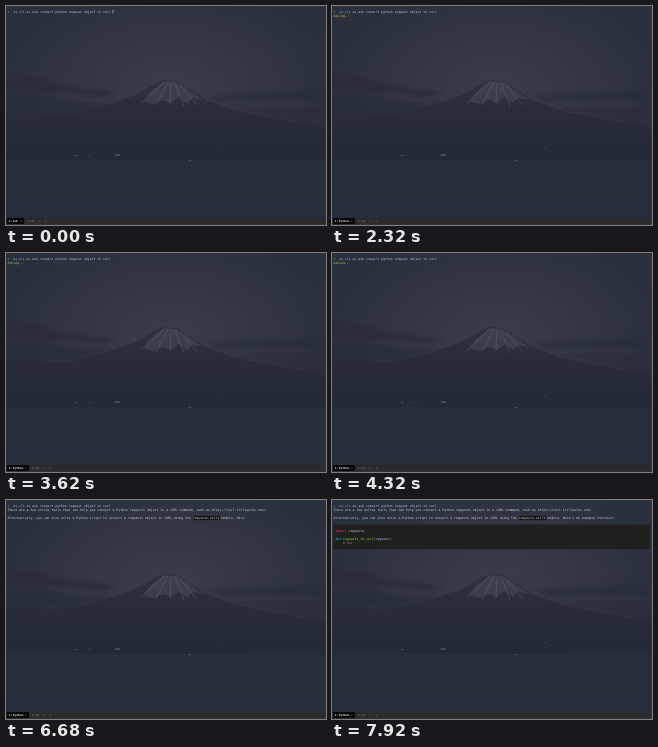
An HTML page for the animation above (8 s loop, 320x219 px).

```html
<!DOCTYPE html>
<html lang="en">
<head>
<meta charset="utf-8">
<title>Terminal</title>
<style>
html, body { margin: 0; width: 100%; height: 100%; overflow: hidden; background: #292f3b; }
svg { display: block; width: 100%; height: 100%; }
text { font: 3.18px "DejaVu Sans Mono", "Liberation Mono", monospace; white-space: pre; text-rendering: geometricPrecision; fill: #ccd2dd; }
.tab { font: 2.7px "DejaVu Sans", "Liberation Sans", sans-serif; fill: #85878c; }
.active { font-weight: bold; fill: #dcdde0; }
.hidden { display: none; }
</style>
</head>
<body>
<svg viewBox="0 0 320 219" preserveAspectRatio="none">
  <defs>
    <radialGradient id="sky" gradientUnits="userSpaceOnUse" cx="165" cy="82" r="180" gradientTransform="translate(0 32.8) scale(1 .6)">
      <stop offset="0" stop-color="#393c49"/>
      <stop offset=".5" stop-color="#323643"/>
      <stop offset="1" stop-color="#2a2f3c"/>
    </radialGradient>
    <linearGradient id="land" gradientUnits="userSpaceOnUse" x1="0" y1="74" x2="0" y2="155">
      <stop offset="0" stop-color="#2e323f"/>
      <stop offset=".45" stop-color="#272c38"/>
      <stop offset="1" stop-color="#242a35"/>
    </linearGradient>
    <linearGradient id="lake" x2="0" y2="1">
      <stop offset="0" stop-color="#282d3a"/>
      <stop offset="1" stop-color="#262c39"/>
    </linearGradient>
    <filter id="soft" x="-20%" y="-50%" width="140%" height="200%"><feGaussianBlur stdDeviation="1.6"/></filter>
    <filter id="haze"><feGaussianBlur stdDeviation=".5"/></filter>
  </defs>

  <rect width="320" height="125" fill="url(#sky)"/>
  <g fill="#2a2e3a" filter="url(#soft)">
    <path d="M-5 71Q20 67 40 74T75 82 112 87L90 91 60 86 30 88-5 82Z" opacity=".8"/>
    <path d="M-5 90Q30 85 55 92T105 95L85 103 60 108-5 106Z" opacity=".75"/>
    <path d="M200 91Q240 85 325 84V97Q270 94 215 97Z" opacity=".6"/>
    <path d="M222 102Q270 97 325 102V120L270 112Z" opacity=".5"/>
  </g>
  <g filter="url(#haze)">
    <path d="M0 156V104L20 103 42 109 65 108 100 99 130 89 150 77 158 74 170 75 180 81 200 94 230 105 270 113 320 122V156Z" fill="url(#land)"/>
    <path d="M158 75L170 76 180 82 197 94 186 92 181 97 173 91 165 97 157 94 147 98 138 96 143 87Z" fill="#4b4f5c" opacity=".5"/>
    <path d="M158 76L135 97M162 76L150 99M165 77L164 98M169 77L178 100M174 79L191 99" fill="none" stroke="#5b606c" stroke-width=".9" opacity=".6"/>
    <rect y="154" width="320" height="60" fill="url(#lake)"/>
    <path d="M75 156H235" stroke="#2e3340" stroke-width=".8"/>
  </g>
  <g fill="#4b505a">
    <rect x="109" y="148.6" width="5" height=".9" fill="#6d6f75"/>
    <rect x="69" y="149" width="3" height=".8"/>
    <rect x="82" y="149" width="3" height=".6" opacity=".6"/>
    <rect x="182" y="154" width="3" height=".8"/>
    <rect x="212" y="142" width="2" height=".8" opacity=".7"/>
  </g>

  <rect y="212" width="320" height="7" fill="#2b2b2e"/>
  <path d="M0 .5H320M319.5 0V219M0 218.5H320" stroke="#343135" fill="none"/>

  <rect id="tabBox" x="1" y="212" height="6" fill="#050506"/>
  <text class="tab active" id="title" x="2.8" y="216.2"></text>
  <g id="otherTabs">
    <text class="tab" x="14" y="216.2" fill="#dcdde0">×</text>
    <text class="tab" x="21" y="216.2">2: zsh</text>
    <text class="tab" x="32" y="216.2">×</text>
    <text class="tab" x="38.5" y="216.2">+</text>
  </g>

  <text x="1.5" y="6.6" fill="#93d0a6"><tspan fill="#93d0a6">➜</tspan></text>
  <text x="7.24" y="6.6"><tspan fill="#8fc0e6">ai_cli</tspan><tspan fill="#c6c8ea"> ai ask convert python request object to curl</tspan></text>
  <rect id="cursor" width=".8" height="3.6" fill="#a9afba"/>
  <text id="asking" x="1.5" y="10.8">Asking...</text>
  <text id="first" x="1.5" y="10.8"></text>
  <rect id="chip" x="187.1" y="15.9" width="26.8" height="4.2" fill="#111416"/>
  <text id="second" x="1.5" y="19.1"></text>

  <g id="code">
    <rect x="1.5" y="24.4" width="316.5" height="24.9" fill="#1e201e"/>
    <text x="3.4" y="31.5"><tspan fill="#f92f66">import</tspan> requests</text>
    <text x="3.4" y="39.8"><tspan fill="#66d0e4">def</tspan> <tspan fill="#a6e22e">requests_to_curl</tspan>(request):</text>
    <text x="11.1" y="43.9"><tspan fill="#959077"># Get</tspan></text>
  </g>
</svg>
<script>
const LOOP = 8000;
const el = id => document.getElementById(id);
const show = (id, on) => el(id).classList.toggle("hidden", !on);

const FIRST = "There are a few online tools that can help you convert a Python requests object to a cURL command, such as https://curl.trillworks.com/.";
const LEAD = "Alternatively, you can also write a Python script to convert a requests object to cURL using the ";
const MODULE = "requests.utils";
const TAIL = " module. Here's an example function:";

// Number of characters streamed so far: [time, count]
const firstSteps = [[0, 0], [4700, 79], [5680, FIRST.length]];
const secondSteps = [[0, 0], [5680, 27], [6680, 124], [7800, 999]];
const stepAt = (steps, t) => steps.filter(s => s[0] <= t).pop()[1];

// Status colour: yellow, drifting to green and back
const YELLOW = [205, 190, 100], GREEN = [145, 205, 115];
const ramp = (t, from) => Math.min(1, Math.max(0, (t - from) / 740));
function statusColour(t) {
  const k = ramp(t, 2320) - ramp(t, 3800);
  return `rgb(${YELLOW.map((y, i) => y + (GREEN[i] - y) * k)})`;
}

const span = (text, fill) => {
  const s = document.createElementNS("http://www.w3.org/2000/svg", "tspan");
  s.textContent = text;
  if (fill) s.setAttribute("fill", fill);
  return s;
};

function drawSecond(count) {
  const mid = LEAD.length, end = mid + MODULE.length;
  const all = LEAD + MODULE + TAIL;
  el("second").replaceChildren(
    span(all.slice(0, Math.min(count, mid))),
    span(all.slice(mid, Math.max(mid, Math.min(count, end))), "#d2dccb"),
    span(all.slice(end, Math.max(end, count))));
  show("chip", count >= end);
}

let shown = -1;
function draw(t) {
  const running = t >= 940;
  el("title").textContent = running ? "1: Python" : "1: zsh";
  el("tabBox").setAttribute("width", running ? 22 : 17);
  el("otherTabs").setAttribute("transform", `translate(${running ? 4.7 : 0})`);

  const entered = t >= 820;
  show("cursor", t < 500 || entered && t < 1800);
  el("cursor").setAttribute("x", entered ? 1.6 : 106.6);
  el("cursor").setAttribute("y", entered ? 8.1 : 3.9);

  show("asking", t >= 1800 && t < 4700);
  el("asking").style.fill = statusColour(t);
  el("asking").style.opacity = Math.min(1, .5 + (t - 1800) / 520);

  el("first").textContent = FIRST.slice(0, stepAt(firstSteps, t));
  const count = stepAt(secondSteps, t);
  if (count !== shown) drawSecond(shown = count);
  show("code", t >= 7800);
}

function tick() {
  draw(performance.now() % LOOP);
  requestAnimationFrame(tick);
}
tick();
</script>
</body>
</html>
```
